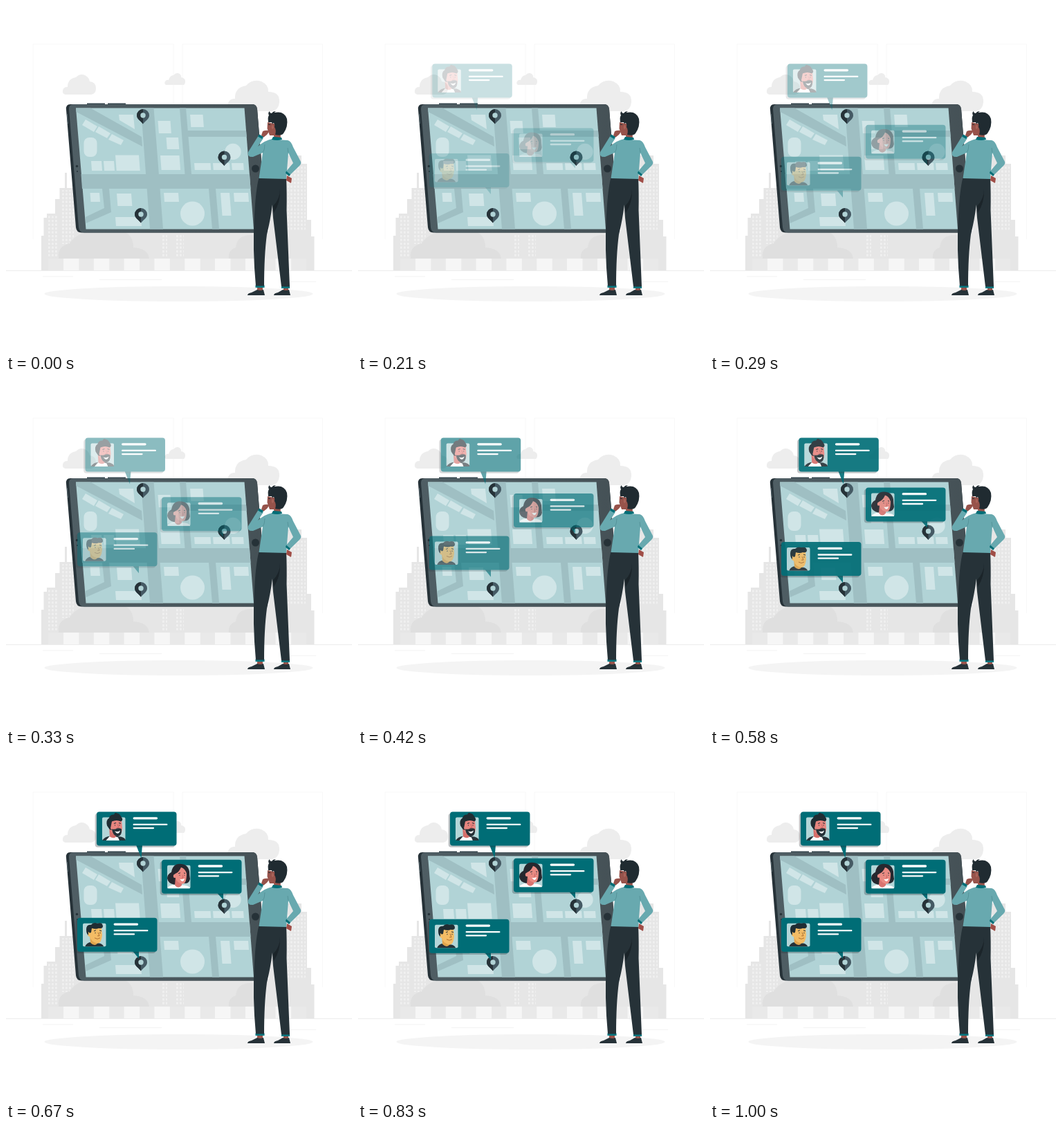
An HTML page for the animation above (1.04 s loop, 500 by 500 pixels).

```html
<!DOCTYPE html>
<html lang="en">
<head>
<meta charset="utf-8">
<title>Map contacts</title>
<style>
html, body { margin: 0; height: 100%; overflow: hidden; background: #fff; }
svg { display: block; width: 100%; height: 100%; }
</style>
</head>
<body>
<svg viewBox="0 0 500 500">
  <defs>
    <pattern id="windows" width="5" height="5.5" patternUnits="userSpaceOnUse">
      <rect x="1" y="1" width="2.8" height="3.2" fill="#f0f0f0"/>
    </pattern>
    <linearGradient id="edge"><stop stop-color="#4f5e64"/><stop offset="1" stop-color="#455156"/></linearGradient>
    <g id="pin">
      <path d="M0 12.5C-3 8-9 5.500-9 0A9 9 0 0 1 9 0C9 5.500 3 8 0 12.500Z" fill="#455a64"/>
      <path d="M0 12.500C-3 8-9 5.500-9 0A9 9 0 0 1 0-9Z" fill="#263238"/>
      <circle r="3.700" fill="#b1d3d6"/>
    </g>
    <g id="base">
      <rect x="-2.300" y="2.200" width="115.500" height="49" rx="4" fill="#263238" opacity=".3"/>
      <rect width="115.500" height="49" rx="4" fill="#006d76"/>
      <rect x="8" y="8" width="33.500" height="33.500" rx="2" fill="#b4d6d8"/>
      <g stroke="#fff" stroke-linecap="round">
        <path d="M54.200 9.300H86.500" stroke-width="3.300"/>
        <path d="M53.700 18.400H101.300M53.700 23.600H82" stroke-width="2.300"/>
      </g>
    </g>
    <clipPath id="photo"><path d="M8-4H41.500V41.500H8Z"/></clipPath>
  </defs>

  <!-- Backdrop -->
  <path d="M39 337V55H242V337M255 337V55H457.500V337" fill="none" stroke="#f8f8f8"/>
  <g fill="#ededed">
    <path d="M86 128Q81 127 82 122T89 117Q89 105 101 103Q107 97 114 100Q120 103 121 109Q130 110 130 119Q130 127 123 128Z"/>
    <path d="M231 114Q228 112 230 109T235 107Q237 100 242 100Q246 95 251 98Q254 101 253 103Q259 104 259 109T256 114Z"/>
    <path d="M326 152Q318 147 321 140T331 134Q330 118 347 115Q356 105 369 109Q380 114 379 124Q396 124 395 139Q394 150 385 152Z"/>
  </g>
  <path d="M51 382V332H54.500V306H59V300H71V279H77.500V263H85V241H88V263H110V325H380V230H405V216H427V228H435V309H441V333H445.500V382Z" fill="#e6e6e6"/>
  <path d="M61 303H75V364H61ZM79 266H98V344H79ZM407 232H433V324H407ZM225 330H233V362H225ZM244 330H257V362H244Z" fill="url(#windows)"/>
  <path d="M76 365Q74 347 92 343Q102 327 125 327H172Q184 332 184 349Q205 350 207 365ZM322 365Q321 352 332 349Q334 331 353 331H364V365Z" fill="#dfdfdf"/>
  <path d="M61.500 365H434V382.500H61.500Z" fill="#e9e9e9"/>
  <path id="stripes" fill="#f6f6f6"/>
  <path d="M0 382.500H500" stroke="#ececec"/>
  <path d="M53 391H97M135 395.500H225M412 398.500H448" stroke="#f3f3f3"/>
  <ellipse cx="249.500" cy="416" rx="194" ry="11" fill="#f4f4f4"/>

  <!-- Tablet -->
  <path d="M117 140.500H143V142.500H117ZM147 140.500H173V142.500H147Z" fill="#37474f"/>
  <path d="M93 142H356Q362 142 363 149L377 321Q378 327.500 371 327.500H109Q102 327.500 101 320L87 150Q86 142 93 142Z" fill="#263238"/>
  <path d="M97 142H356Q362 142 363 149L377 321Q378 327.500 371 327.500H113Q106 327.500 105 320L91 149Q91 142 97 142Z" fill="url(#edge)"/>
  <path d="M88.300 156L89.500 170" stroke="#56666d"/>
  <g fill="#263238"><circle cx="102.500" cy="231.500" r="1.700"/><circle cx="103" cy="239" r="1"/><circle cx="360.500" cy="235" r="5.500"/></g>
  <path d="M101 147.500H344.500L358 322.500H115.500Z" fill="#b1d3d6"/>
  <path d="M195 147.500H213.500L227 322.500H208ZM108.500 243H352L353.500 264H110ZM251 147.500H260L268 243H258.500ZM262 180H347L347.700 189H263ZM101 147.500H122L196 189L197 203L101.500 153ZM139 264H149L152 298L115.500 314L114.800 305L142 292ZM293 264H303L308 322.500H298Z" fill="#9fbfc3"/>
  <path id="blocks" fill="#d0e5e7"/>
  <g fill="#d0e5e7">
    <path d="M163 157H184L186 178L164 165ZM115 164L132 174L127 182L110 172ZM134 174L151 184L146 191L129 182ZM153 185L170 194L166 201L148 193Z"/>
    <rect x="112.500" y="190" width="19" height="28" rx="8"/>
    <circle cx="328" cy="210.500" r="11.700"/><circle cx="269.500" cy="300" r="17.500"/>
  </g>
  <use href="#pin" x="198" y="158"/><use href="#pin" x="315.500" y="218.500"/><use href="#pin" x="195" y="301"/>

  <!-- Contact cards -->
  <g class="card" data-x="131" data-y="83.500" data-dx="-30" data-dy="0">
    <path d="M57 48H66L64.500 67Z" fill="#006d76"/><use href="#base"/>
    <g clip-path="url(#photo)">
      <path d="M8 42Q11 36 20 35L35 36Q42 38 42 42Z" fill="#263238"/>
      <path d="M13 42L20 34L31 37L33 42Z" fill="#fff"/>
      <path d="M18 20L19 36Q25 40 29 35L27 25Z" fill="#d56f6a"/>
      <path d="M18 12Q27 8 36 12L37 23Q37 34 30 35Q21 33 18 22Z" fill="#e6857f"/>
      <path d="M15 20Q13 12 18 9Q19 4 25 4Q27 0 29 2Q33 2 36 8Q39 12 35 14Q29 11 22 14L20 24L22 26Q19 27 17 23Z" fill="#202d33"/>
      <path d="M22 25Q27 26 29 24Q34 23 36 25Q37 35 30 36Q23 34 22 25Z" fill="#263238"/>
      <path d="M26 28Q31 30 34 27Q33 32 29 31Z" fill="#fff"/>
      <path d="M25 17L28 16M32 16L35 17M26.500 19V20M33 19V20" stroke="#263238" stroke-width="1.200"/>
      <path d="M30 18L32 23H29" fill="none" stroke="#c65f5f" stroke-width=".8"/>
    </g>
  </g>
  <g class="card" data-x="225" data-y="152.700" data-dx="0" data-dy="30">
    <path d="M80 48H89V58Z" fill="#006d76"/><use href="#base"/>
    <g clip-path="url(#photo)">
      <path d="M8 42Q9 37 19 36L33 37Q41 38 41 42Z" fill="#fff"/>
      <path d="M8 27Q8 21 14 18Q16 6 26 6Q38 6 40 17Q40 22 41 28Q39 36 30 34L18 36Q9 34 8 27Z" fill="#26282f"/>
      <path d="M20 25L19 37Q24 43 29 37L29 30Z" fill="#d87470"/>
      <path d="M20 20Q25 18 28 11Q34 13 36 20Q36 35 30 35Q22 34 20 26Q16 27 17 22Z" fill="#e98b83"/>
      <path d="M24 20L27 19M32 19L34 20M26 22V23M33 22V23" stroke="#263238"/>
      <path d="M26 28Q30 29 33 27Q32 32 29 31Z" fill="#fff"/>
      <path d="M30 22L31 26H29" fill="none" stroke="#c65f5f" stroke-width=".8"/>
    </g>
  </g>
  <g class="card" data-x="103" data-y="236.800" data-dx="0" data-dy="-30">
    <path d="M80 48H89V59Z" fill="#006d76"/><use href="#base"/>
    <g clip-path="url(#photo)">
      <path d="M11 42Q13 36 20 35L33 37Q38 39 38 42Z" fill="#263238"/>
      <path d="M18 24L19 36Q25 42 29 37L28 28Z" fill="#e0a44c"/>
      <path d="M18 15Q26 10 35 14L36 25Q35 37 29 37Q20 35 18 27Q14 27 15 21Z" fill="#f3bc65"/>
      <path d="M13 17Q13 9 20 10Q23 6 29 8Q37 6 37 13Q36 16 31 15Q27 17 21 15L20 21L18 22L16 20V25Q13 23 13 17Z" fill="#202d33"/>
      <path d="M24 19L27 18M32 18L35 19M26 21V22.500M33 21V22.500" stroke="#263238"/>
      <path d="M25 29Q29 32 33 29M30 21L32 26H29" fill="none" stroke="#a9692f" stroke-width=".9"/>
    </g>
  </g>

  <!-- Onlooker -->
  <path d="M363 405H371V412H363ZM401 405H408V412H401ZM378 168L377.500 177L381 187L387 187L388 193L397 193L396 172Z" fill="#97534b"/>
  <path d="M363 410Q367 412 372 410L374 418H349Q349 415 355 414ZM400 410Q405 412 409 410L411 418H387Q387 415 393 414Z" fill="#263238"/>
  <path d="M360.500 403.500H373.500V407H360.500ZM398 404.500H410V408H398Z" fill="#007780"/>
  <path d="M365.500 248H405Q406 270 405.500 295L410 405.500H398L386 306Q385 295 385 287Q382 310 377 330Q373 360 373 404.500H361Q356 350 359 302Q361 265 365.500 248Z" fill="#263238"/>
  <path d="M396 265Q396 279 386 289L387 299Q397 283 396 265Z" fill="#1b2429"/>
  <path d="M369 187L371 181Q375 179 380 180Q380 183 377 186L372 190Z" fill="#97534b"/>
  <path d="M406 245L413 249L412 256L405 252Z" fill="#a04e47"/>
  <path d="M385 192Q397 194 407 194Q412 195 415 204L426 225Q427 228 424 231L409 245.500L404 240L415 227L408 212L405 250L365.500 249L371 212L357 218Q348 219 350 211L365 187L372 191L364 203Q374 194 385 192Z" fill="#68a9af"/>
  <path d="M371 212Q374 208 374 200M408 212L407 205" fill="none" stroke="#528f95" stroke-width=".8"/>
  <path d="M386 189L398 190L399 193Q392 195 384 193ZM366 185.500L372 189L370 192L364 188.500ZM405 238.500L411 243.500L409 246L404 241.500Z" fill="#006d76"/>
  <path d="M379 168Q378 160 380 158Q378 154 381 152Q381 155 384 155Q386 152 390 152Q387 154 388 154Q402 151 406 163Q408 174 401 184Q398 188 389 186Q391 179 388 175Q389 169 386 169Q385 172 384 168Z" fill="#202b31"/>
  <path d="M386 172Q383 172 384 177Q386 179 387 176" fill="#a9645a"/>
  <path d="M379 171L382 171.500" stroke="#202b31"/>
</svg>
<script>
const slant = 0.077;
const blocks = [
  [123, 224, 15, 14], [141, 224, 15, 14], [158, 215.5, 34, 22.5],
  [219.500, 166, 18, 18], [231.500, 190, 17.5, 17], [223, 216, 27.5, 21],
  [266, 157, 18.5, 18], [272, 227, 23.5, 10], [299, 227, 24, 10], [326, 227, 17, 10],
  [121.500, 270, 13.5, 13], [160, 271, 21, 18], [158, 305, 37, 13],
  [228, 270, 21, 13], [310, 270, 13, 33], [329, 270, 21, 13]
];
const parallelogram = ([x, y, w, h]) => `M${x} ${y}h${w}l${h * slant} ${h}h${-w}Z`;
document.getElementById('blocks').setAttribute('d', blocks.map(parallelogram).join(''));

let stripes = '';
for (let i = 0; i < 8; i++) stripes += `M${83 + i * 43.8} 365h22.5v17h-22.5Z`;
document.getElementById('stripes').setAttribute('d', stripes);

// Cubic Bezier (.36, -.01, .5, 1.38) with a slight overshoot
const curve = (s, a, b) => 3 * (1 - s) ** 2 * s * a + 3 * (1 - s) * s * s * b + s ** 3;
function ease(t) {
  let low = 0, high = 1;
  for (let i = 0; i < 24; i++) {
    const mid = (low + high) / 2;
    if (curve(mid, 0.36, 0.5) < t) low = mid; else high = mid;
  }
  return curve(high, -0.01, 1.38);
}

const loop = 1040, fps = 24, steps = 25;
const cards = [...document.querySelectorAll('.card')];
const start = performance.now();

function draw() {
  const time = (performance.now() - start) % loop;
  const step = Math.min(steps - 1, Math.floor((time + 5) * fps / 1000));
  const progress = ease((step + 1) / steps);
  for (const card of cards) {
    const { x, y, dx, dy } = card.dataset;
    const rest = 1 - progress;
    card.setAttribute('transform', `translate(${+x + dx * rest} ${+y + dy * rest})`);
    card.setAttribute('opacity', step ? Math.max(0, Math.min(1, progress)) : 0);
  }
  requestAnimationFrame(draw);
}
draw();
</script>
</body>
</html>
```
